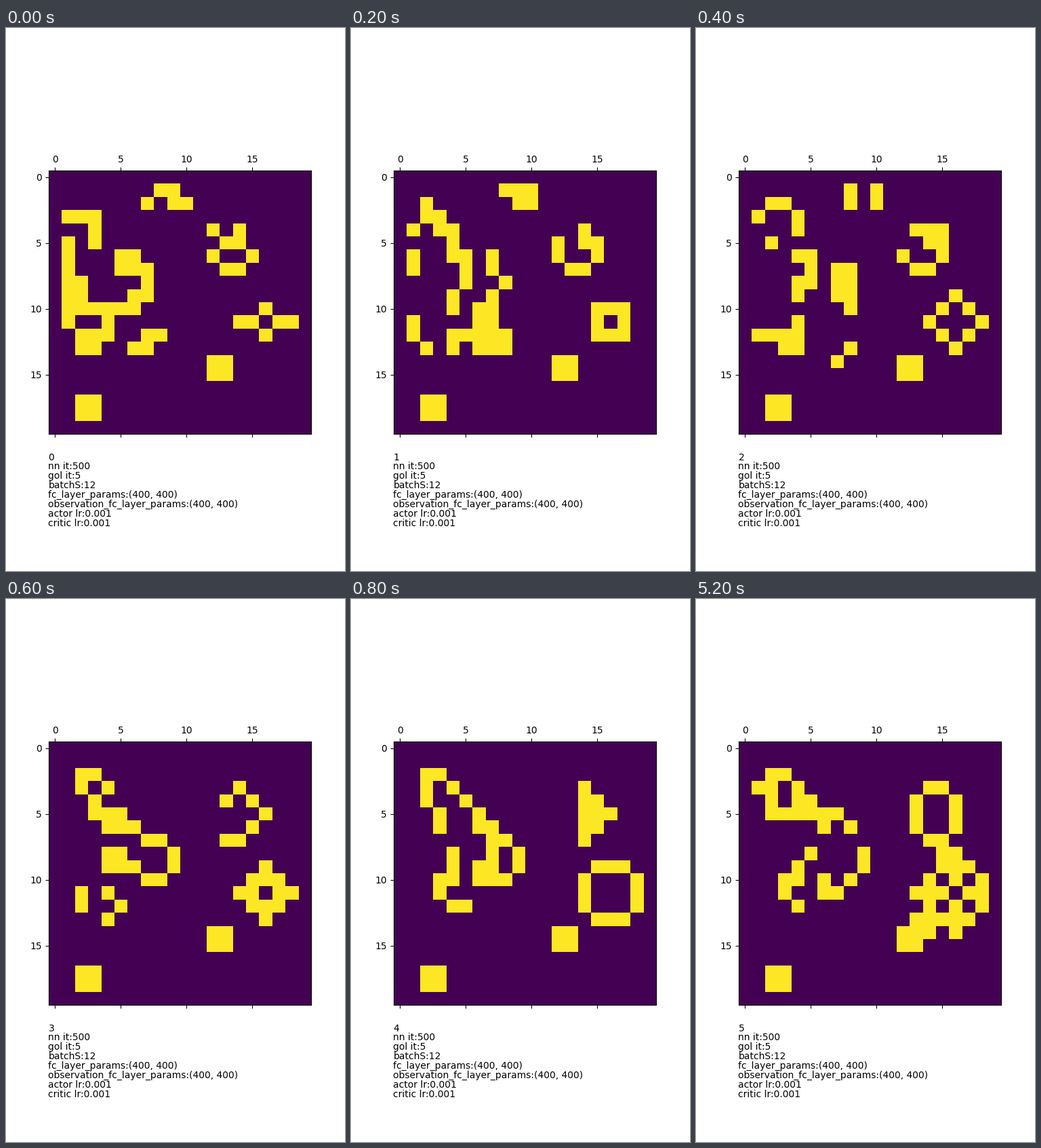
Recreate the animation shown at these times as a matplotlib script. Size 500 px wide and 800 px high, loop 8000 ms.

```python
import itertools

import matplotlib.pyplot as plt
import numpy as np
from matplotlib.animation import FuncAnimation

SIZE = 20
STEP_MS = 200
LOOP_MS = 8000
LAST_GEN = 5

# corners (row, column) of the strokes that make up the starting cells
COIL = [(5, 1), (11, 1), (8, 1), (8, 2), (10, 2), (10, 6), (9, 6),
        (9, 7), (7, 7), (7, 5), (6, 5), (6, 6)]
HOOK = [(3, 1), (3, 3), (5, 3)]
TAIL = [(11, 4), (12, 4), (12, 2), (13, 2), (13, 3)]
STAIR = [(12, 8), (12, 7), (13, 7), (13, 6)]
WAVE = [(2, 7), (1, 8), (1, 9), (2, 9), (2, 10)]
CUP = [(4, 12), (5, 13), (5, 14), (4, 14)]
SMILE = [(6, 12), (7, 13), (7, 14), (6, 15)]

INFO = [
    "nn it:500",
    "gol it:5",
    "batchS:12",
    "fc_layer_params:(400, 400)",
    "observation_fc_layer_params:(400, 400)",
    "actor lr:0.001",
    "critic lr:0.001",
]


def stroke(grid, corners):
    """Fill the cells along straight or diagonal lines between corners."""
    for a, b in itertools.pairwise(corners):
        steps = max(abs(b[0] - a[0]), abs(b[1] - a[1]))
        rows, cols = np.linspace(a, b, steps + 1).round().astype(int).T
        grid[rows, cols] = 1


def block(grid, row, col):
    grid[row:row + 2, col:col + 2] = 1


def cross(grid, row, col):
    """Hollow cross, twice as wide as it is high."""
    r, c = np.indices(grid.shape)
    reach = 2 * abs(r - row) + abs(c - col)
    grid[(reach == 1) | (reach == 2)] = 1


def seed_grid():
    grid = np.zeros((SIZE, SIZE), dtype=int)
    for corners in (COIL, HOOK, TAIL, STAIR, WAVE, CUP, SMILE):
        stroke(grid, corners)
    cross(grid, 11, 16)
    block(grid, 14, 12)
    block(grid, 17, 2)
    return grid


def life_step(grid):
    """One Game of Life generation; the border cells stay dead."""
    total = sum(grid[r:r + SIZE - 2, c:c + SIZE - 2]
                for r, c in itertools.product(range(3), repeat=2))
    core = grid[1:-1, 1:-1]
    near = total - core
    new = np.zeros_like(grid)
    new[1:-1, 1:-1] = (near == 3) | ((core == 1) & (near == 2))
    return new


generations = [seed_grid()]
for _ in range(LAST_GEN):
    generations.append(life_step(generations[-1]))

fig, ax = plt.subplots(figsize=(5, 8), dpi=100)
board = ax.matshow(generations[0], cmap="viridis", vmin=0, vmax=1)


def add_line(y, text):
    return ax.text(0, y, text, transform=ax.transAxes)


counter = add_line(-0.102, "0")
for i, text in enumerate(INFO):
    add_line(-0.136 - 0.036 * i, text)


def update(frame):
    gen = min(frame, LAST_GEN)
    board.set_data(generations[gen])
    counter.set_text(str(gen))
    return board, counter


anim = FuncAnimation(fig, update, frames=LOOP_MS // STEP_MS,
                     interval=STEP_MS, repeat=True, repeat_delay=0)
plt.show()
```
